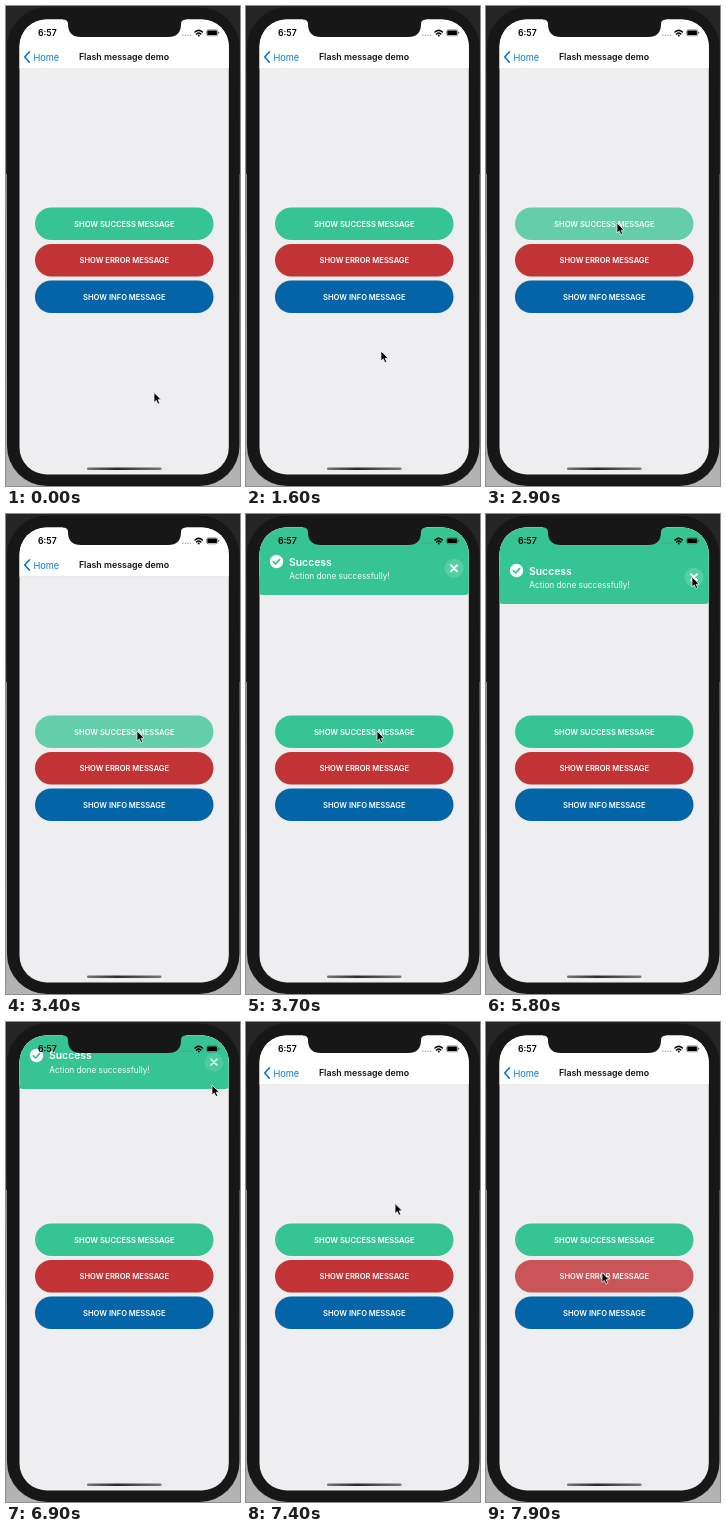
An HTML page for the animation above (8000 ms loop, 234 by 480 pixels).

```html
<!DOCTYPE html>
<html lang="en">
<head>
<meta charset="utf-8">
<title>Flash message demo</title>
<style>
  html, body { margin: 0; width: 100%; height: 100%; overflow: hidden; background: #262626; }
  svg { display: block; width: 234px; height: 480px; font-family: Inter, Roboto, sans-serif; }
  .label { font-size: 7.55px; font-weight: 600; fill: #fff; text-anchor: middle; }
  .title { font-size: 8.85px; font-weight: 600; fill: #111; text-anchor: middle; }
  .time { font-size: 8.7px; font-weight: 600; }
  .line { fill: none; stroke-linecap: round; stroke-linejoin: round; }
</style>
</head>
<body>
<svg viewBox="0 0 234 480">
  <defs>
    <linearGradient id="desk" x2="0" y2="1">
      <stop offset="0" stop-color="#242424"/>
      <stop offset=".35" stop-color="#2c2c2c"/>
      <stop offset=".35" stop-color="#8c8c8c"/>
      <stop offset="1" stop-color="#b4b4b4"/>
    </linearGradient>
    <linearGradient id="bar">
      <stop offset="0" stop-color="#777"/>
      <stop offset=".4" stop-color="#2a2a2a"/>
      <stop offset="1" stop-color="#777"/>
    </linearGradient>
    <clipPath id="screen"><rect x="13.5" y="13.4" width="209.3" height="455" rx="27"/></clipPath>
  </defs>

  <rect width="234" height="480" fill="url(#desk)"/>
  <rect x="1" y="1.5" width="232.5" height="478.5" rx="40" fill="#171717"/>

  <g clip-path="url(#screen)">
    <rect x="13" y="13" width="210" height="456" fill="#eeedef"/>
    <rect x="13" y="13" width="210" height="49.5" fill="#fff"/>
    <rect x="13" y="62.3" width="210" height=".5" fill="#dcdcde"/>
    <path class="line" d="M23.3 46 18.7 51l4.6 5" stroke="#0b7ac9" stroke-width="1.7"/>
    <text x="27.4" y="54.5" font-size="9.2" fill="#0b7ac9">Home</text>
    <text class="title" x="118" y="54">Flash message demo</text>

    <g id="buttons"></g>

    <g id="banner">
      <rect x="13" y="-40" width="210" height="130" rx="4" fill="#36c494"/>
      <circle cx="30.5" cy="56.5" r="6.7" fill="#fff"/>
      <path class="line" d="M27.4 56.8l2.2 2.2 4-4.4" stroke="#36c494" stroke-width="1.7"/>
      <text x="43" y="60.5" font-size="10.4" font-weight="600" fill="#fff">Success</text>
      <text x="43.3" y="74.2" font-size="8.25" fill="#fff" fill-opacity=".95">Action done successfully!</text>
      <g id="close">
        <circle cx="208" cy="63.2" r="9.5" fill="#fff" fill-opacity=".16"/>
        <path class="line" d="M205 60.2l6 6m0-6-6 6" stroke="#fff" stroke-width="1.9"/>
      </g>
    </g>

    <text class="time" x="32" y="30.2">6:57</text>
    <g fill="#777">
      <circle cx="176.8" cy="29.2" r=".6"/><circle cx="179.3" cy="29.2" r=".6"/>
      <circle cx="181.8" cy="29.2" r=".6"/><circle cx="184.3" cy="29.2" r=".6"/>
    </g>
    <g class="line" stroke="#000" stroke-width="1.5">
      <path d="M189 26q3.7-3.2 7.4 0"/><path d="M190.5 28q2.2-1.8 4.4 0"/>
    </g>
    <circle cx="192.7" cy="29.6" r="1"/>
    <rect x="200.6" y="23.8" width="11" height="6" rx="1.6" fill="none" stroke="#555" stroke-width=".6"/>
    <rect x="201.3" y="24.5" width="9.6" height="4.6" rx=".9"/>
    <rect x="212.3" y="25.8" width=".8" height="2" rx=".4" fill="#555"/>
    <rect x="81" y="461.4" width="74.5" height="2.6" rx="1.3" fill="url(#bar)"/>
  </g>

  <path fill="#171717" d="M57 12H180V13.4Q175 13.4 175 18Q175 31 162 31H75Q62 31 62 18Q62 13.4 57 13.4Z"/>
  <path id="cursor" d="M0 0V10L2.3 7.9 3.9 11.6 5.7 10.8 4.1 7.2H7.2Z"
        fill="#000" stroke="#fff" stroke-width=".7" stroke-linejoin="round"/>
</svg>

<script>
const LOOP = 8000, STEP = 100;
const $ = id => document.getElementById(id);

const buttons = [
  ["SUCCESS", "#36c494", 201.5],
  ["ERROR", "#c23336", 238],
  ["INFO", "#0364a8", 274.5]
];
$("buttons").innerHTML = buttons.map(([name, color, y]) =>
  `<g><rect x="29" y="${y}" width="178.5" height="32.4" rx="16.2" fill="${color}"/>
   <text class="label" x="118.3" y="${y + 19}">SHOW ${name} MESSAGE</text></g>`).join("");
const [success, error] = $("buttons").children;

// Rows: time, then values
const pointer = [
  [0, 148, 386.5], [900, 148, 386.5], [1600, 135, 345], [1750, 135, 343],
  [2500, 131, 217], [4000, 131, 217], [4500, 145, 97], [5200, 206, 63],
  [7000, 206, 63], [7700, 116, 250.5], [LOOP, 116, 250.5]
];
const slide = [[3525, -91], [3750, 0], [6820, 0], [7045, -91]];
const successFade = [[2720, 1], [2870, .75], [3440, .75], [3690, 1]];
const errorFade = [[7760, 1], [7910, .8]];
const closeFade = [[6650, 1], [6780, .75]];

const linear = u => u;
const easeInOut = u => u < .5 ? 2 * u * u : 1 - 2 * (1 - u) ** 2;

function sample(rows, t, ease = easeInOut) {
  if (t <= rows[0][0]) return rows[0].slice(1);
  const i = rows.findIndex(r => r[0] > t);
  if (i < 0) return rows[rows.length - 1].slice(1);
  const a = rows[i - 1], b = rows[i];
  const u = ease((t - a[0]) / (b[0] - a[0]));
  return a.slice(1).map((v, k) => v + (b[k + 1] - v) * u);
}

function draw(t) {
  const [x, y] = sample(pointer, t);
  const [drop] = sample(slide, t);
  $("cursor").setAttribute("transform", `translate(${x} ${y})`);
  $("banner").setAttribute("transform", `translate(0 ${drop})`);
  success.setAttribute("opacity", sample(successFade, t, linear)[0]);
  error.setAttribute("opacity", sample(errorFade, t, linear)[0]);
  $("close").setAttribute("opacity", sample(closeFade, t, linear)[0]);
}

const start = performance.now();
function tick() {
  const t = (performance.now() - start) % LOOP;
  draw(Math.floor(t / STEP) * STEP);
  requestAnimationFrame(tick);
}
draw(0);
requestAnimationFrame(tick);
</script>
</body>
</html>
```
